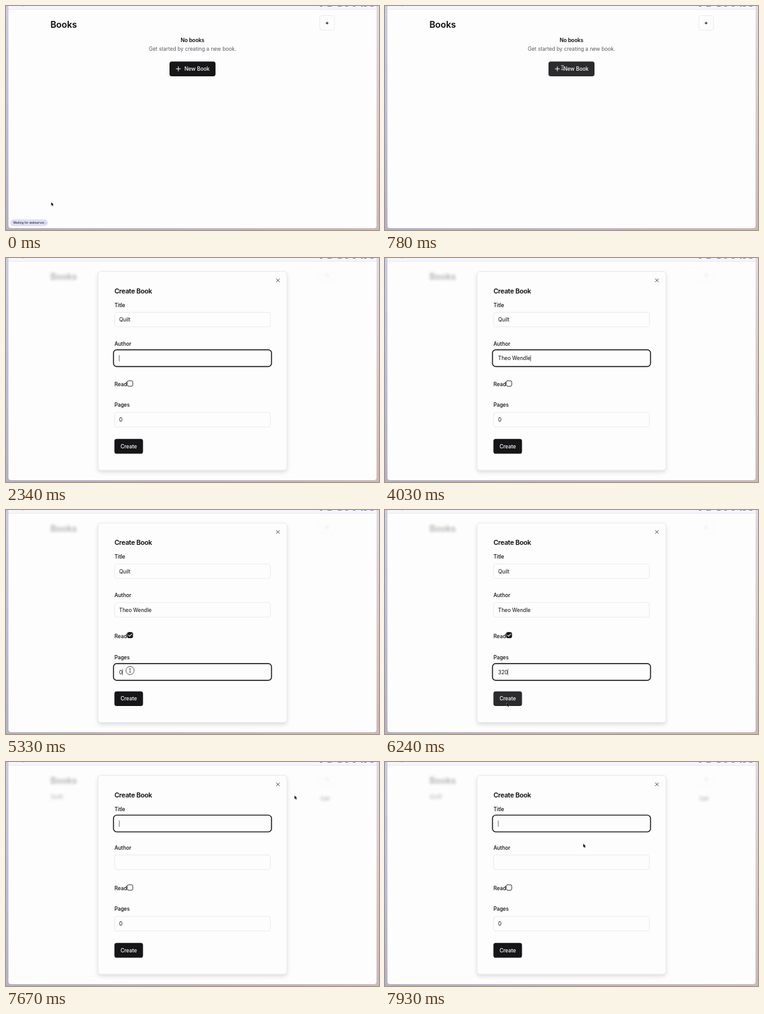
Animation, 600 px wide and 360 px high, one loop 8 s. Source, as an HTML page:

```html
<!DOCTYPE html>
<html lang="en">
<head>
<meta charset="utf-8">
<title>Books</title>
<style>
  html, body { margin: 0; width: 100%; height: 100%; overflow: hidden; background: #fdfdfd; }
  svg { display: block; width: 600px; height: 360px; }
  text { font: 400 8.33px Inter, "Liberation Sans", sans-serif; fill: #09090b; white-space: pre; }
  .medium { font-weight: 500; }
  .semi { font-weight: 600; }
  .field, .outline { fill: #fdfdfd; stroke: #e2e2e6; stroke-width: .7; }
  .line { fill: none; stroke-linecap: round; stroke-linejoin: round; }
</style>
</head>
<body>
<svg viewBox="0 0 600 360">
  <defs>
    <linearGradient id="leftEdge" x2="0" y2="1">
      <stop stop-color="#cccbed"/><stop offset=".6" stop-color="#bcbce2"/><stop offset="1" stop-color="#b4b3cc"/>
    </linearGradient>
    <linearGradient id="rightEdge" x2="0" y2="1">
      <stop stop-color="#dedae8"/><stop offset=".5" stop-color="#d8c9d0"/><stop offset="1" stop-color="#c8b9be"/>
    </linearGradient>
    <linearGradient id="bottomEdge">
      <stop stop-color="#b2b1c8"/><stop offset="1" stop-color="#c8babf"/>
    </linearGradient>
    <filter id="blur" x="0" y="0" width="600" height="360" filterUnits="userSpaceOnUse">
      <feGaussianBlur stdDeviation="1.9"/>
    </filter>
    <filter id="shadow" x="130" y="10" width="340" height="350" filterUnits="userSpaceOnUse">
      <feDropShadow dx="0" dy="3" stdDeviation="3" flood-opacity=".13"/>
    </filter>
  </defs>

  <rect width="300" height="360" fill="url(#leftEdge)"/>
  <rect x="300" width="300" height="360" fill="url(#rightEdge)"/>
  <rect y="356" width="600" height="4" fill="url(#bottomEdge)"/>
  <rect x="4" y="-8" width="592" height="365" rx="4" fill="#fdfdfd"/>

  <g id="page">
    <text class="semi" x="71.4" y="34.8" style="font-size:14.28px">Books</text>
    <rect class="outline" x="504.8" y="15.4" width="23.6" height="23.4" rx="3.6" id="addButton"/>
    <path class="line" d="M514.4 27.5h4.2M516.5 25.4v4.2" stroke="#09090b" stroke-width="1" style="stroke-linecap:butt"/>
    <g id="empty">
      <text class="semi" x="300" y="57.6" text-anchor="middle">No books</text>
      <text x="300" y="71.9" text-anchor="middle" style="fill:#5b5b64">Get started by creating a new book.</text>
      <rect x="263" y="89.2" width="74" height="23.7" rx="3.6" id="newButton"/>
      <path class="line" d="M273.7 101h7M277.2 97.5v7" stroke="#fff" stroke-width="1"/>
      <text class="medium" x="287" y="104" style="fill:#fff">New Book</text>
    </g>
    <g id="list">
      <text x="71.4" y="59.1" style="font-size:9.52px">Quilt</text>
      <text class="medium" x="505.9" y="62.1">Edit</text>
    </g>
  </g>

  <rect x="4" width="592" height="5.4" fill="#f5f5fd"/>
  <rect x="4" y="5.2" width="592" height=".7" fill="#e3e3ee"/>
  <path d="M505 .5h4M517 .5h7M534 .5h6M546 .5h4M558 .5h4M571 .5h3M576 .5h4M586 .5h5" stroke="#7b76ee" stroke-width="1.2"/>
  <path d="M26 .3h3" stroke="#c9c9d8" stroke-width=".8"/>

  <g id="modal">
    <rect id="panel" x="148.1" width="303.8" rx="4.8" fill="#fdfdfd" stroke="#dfdfe4" stroke-width=".7" filter="url(#shadow)"/>
    <g id="upper">
      <path class="line" d="M435 33.5l4.8 4.8m0-4.8l-4.8 4.8" stroke="#3f3f46" stroke-width="1"/>
      <text class="semi" x="174.4" y="57" style="font-size:10.71px;letter-spacing:-.025em">Create Book</text>
      <text class="medium" x="174.4" y="78.9">Title</text>
      <rect class="field" x="174.7" y="87.3" width="250.6" height="23.4" rx="3.6"/>
      <text class="medium" x="174.4" y="140.8">Author</text>
      <rect class="field" x="174.7" y="149.4" width="250.6" height="23.4" rx="3.6"/>
      <text id="titleText" x="182" y="102.2"></text>
      <text id="authorText" x="182" y="164.2"></text>
      <rect id="box" x="195.1" y="197.3" width="8.8" height="8.8" rx="2.2" stroke="#18181b" stroke-width=".9"/>
      <path id="tick" class="line" d="M197.1 201.8l1.7 1.7 3.4-3.5" stroke="#fff" stroke-width="1.1"/>
    </g>
    <g id="lower">
      <text class="medium" x="174.4" y="205.7">Read</text>
      <text class="medium" x="174.4" y="239.2">Pages</text>
      <rect class="field" x="174.7" y="248.1" width="250.6" height="23.4" rx="3.6"/>
      <text id="pagesText" x="182" y="263">0</text>
      <rect id="createButton" x="174.4" y="290.8" width="46" height="23.7" rx="3.6"/>
      <text class="medium" x="197.4" y="305.6" text-anchor="middle" style="fill:#fff">Create</text>
    </g>
    <rect id="ring" fill="none" stroke="#09090b" stroke-width="1.4"/>
    <path id="caret" d="M0 0v10" stroke="#09090b" stroke-width=".6"/>
  </g>

  <g id="status">
    <rect x="7.4" y="343.3" width="59.4" height="10" rx="5" fill="#dedef6" stroke="#cfcfec" stroke-width=".5"/>
    <text class="medium" x="11.5" y="350" textLength="" style="font-size:4.75px;fill:#2b2b3c">Waiting for webserver...</text>
  </g>

  <g id="cursor">
    <circle id="press" r="6.6" fill="#fff" fill-opacity=".75" stroke="#3f3f46" stroke-width=".9"/>
    <path id="arrow" d="M0 0v5.4l1.3-1.2 1 2.2 1-.5-1-2.1h1.7z" fill="#000" stroke="#fff" stroke-width=".5" paint-order="stroke"/>
    <g id="beam">
      <path class="line" d="M-1.4-3.2q1.4 0 1.4 1v4.4q0 1-1.4 1M1.4-3.2q-1.4 0-1.4 1M0 2.2q0 1 1.4 1" stroke="#fff" stroke-width="1.5"/>
      <path class="line" d="M-1.4-3.2q1.4 0 1.4 1v4.4q0 1-1.4 1M1.4-3.2q-1.4 0-1.4 1M0 2.2q0 1 1.4 1" stroke="#222" stroke-width=".7"/>
    </g>
  </g>
</svg>
<script>
const LOOP = 8000, STEP = 130;
const el = {};
document.querySelectorAll('[id]').forEach(node => el[node.id] = node);

const show = (node, on) => node.style.display = on ? '' : 'none';
const set = (node, attrs) => { for (const k in attrs) node.setAttribute(k, attrs[k]); };
const within = (t, from, to) => t >= from && t < to;
const inside = ([x, y], left, top, right, bottom) => x >= left && x <= right && y >= top && y <= bottom;

// One time per character
const TITLE = { text: 'Quilt', times: [1430, 1690, 1820, 1950, 2080] };
const AUTHOR = { text: 'Theo Wendle', times: [2990, 3120, 3250, 3380, 3510, 3640, 3640, 3770, 3900, 3900, 4030] };
const typed = ({ text, times }, t) => text.slice(0, times.filter(at => at <= t).length);

function pagesValue(t) {
  if (t < 5460) return '0';
  return '320'.slice(0, Math.floor((t - 5460) / STEP));
}

// time, x, y
const PATH = [
  [0, 72.7, 315.4], [780, 285.5, 99], [910, 278, 108], [1170, 272, 119.5],
  [4550, 272, 119.5], [5200, 199.5, 258], [5720, 199.5, 258], [6110, 198, 314],
  [6240, 196, 310], [6370, 150, 284], [6760, 46.5, 172], [6890, 46.5, 172],
  [7410, 515, 27], [7540, 515, 27], [7930, 319, 131.6]
];

function cursorAt(t) {
  const i = PATH.findIndex(p => p[0] > t);
  if (i < 0) return PATH[PATH.length - 1].slice(1);
  const [t0, x0, y0] = PATH[i - 1], [t1, x1, y1] = PATH[i];
  const u = (t - t0) / (t1 - t0), e = u * u * (3 - 2 * u);
  return [x0 + (x1 - x0) * e, y0 + (y1 - y0) * e];
}

function drawCursor(t, open) {
  const pos = cursorAt(t);
  const overField = open && [87, 149, 248].some(y => inside(pos, 175, y, 425, y + 24));
  const overLabel = !open && t < 910 && inside(pos, 284, 95, 329, 107);
  const beam = overField || overLabel;
  show(el.cursor, !within(t, 1430, 4680) && !within(t, 5460, 5720));
  set(el.cursor, { transform: `translate(${pos})` });
  show(el.beam, beam);
  show(el.arrow, !beam);
  show(el.press, t === 5330);
  const tone = over => over ? '#2b2b2d' : '#161618';
  set(el.newButton, { fill: tone(!open && inside(pos, 263, 89, 337, 113)) });
  set(el.createButton, { fill: tone(open && inside(pos, 174, 291, 220, 315)) });
  el.addButton.style.fill = !open && inside(pos, 505, 15, 528, 39) ? '#f4f4f5' : '';
}

function drawForm(t) {
  const checked = t >= 4550, shift = checked ? 0.6 : 0;
  set(el.panel, { y: 21.6 - shift, height: 319.4 + 2 * shift });
  set(el.upper, { transform: `translate(0 ${-shift})` });
  set(el.lower, { transform: `translate(0 ${shift})` });
  set(el.box, { fill: checked ? '#18181b' : '#fdfdfd' });
  show(el.tick, checked);

  el.titleText.textContent = typed(TITLE, t);
  el.authorText.textContent = typed(AUTHOR, t);
  el.pagesText.textContent = pagesValue(t);

  const onBox = within(t, 4290, 5330);
  if (onBox) {
    set(el.ring, { x: 193, y: 195.2 - shift, width: 13, height: 13, rx: 4 });
    show(el.caret, false);
    return;
  }
  const [field, top] = t < 2340 ? [el.titleText, 87]
    : t < 4290 ? [el.authorText, 149.1]
    : [el.pagesText, 247.8 + shift];
  set(el.ring, { x: 172.8, y: top - 1.6, width: 254.4, height: 27, rx: 5.4 });
  const width = field.textContent ? field.getComputedTextLength() : 0;
  set(el.caret, { transform: `translate(${182.2 + width} ${top + 7.1})` });
  show(el.caret, t >= 1040 && !within(t, 2600, 2990));
}

function render(time) {
  const t = Math.floor(time % LOOP / STEP) * STEP;
  const open = within(t, 910, 6370) || t >= 7670;
  const saved = t >= 6370;
  show(el.empty, !saved);
  show(el.list, saved);
  show(el.status, t < 130);
  show(el.modal, open);
  set(el.page, { filter: open ? 'url(#blur)' : 'none', opacity: open ? 0.3 : 1 });
  if (open) drawForm(saved ? 1040 : t);
  drawCursor(t, open);
}

const start = performance.now();
function tick(now) {
  render(Math.max(0, now - start));
  requestAnimationFrame(tick);
}
render(0);
requestAnimationFrame(tick);
</script>
</body>
</html>
```
